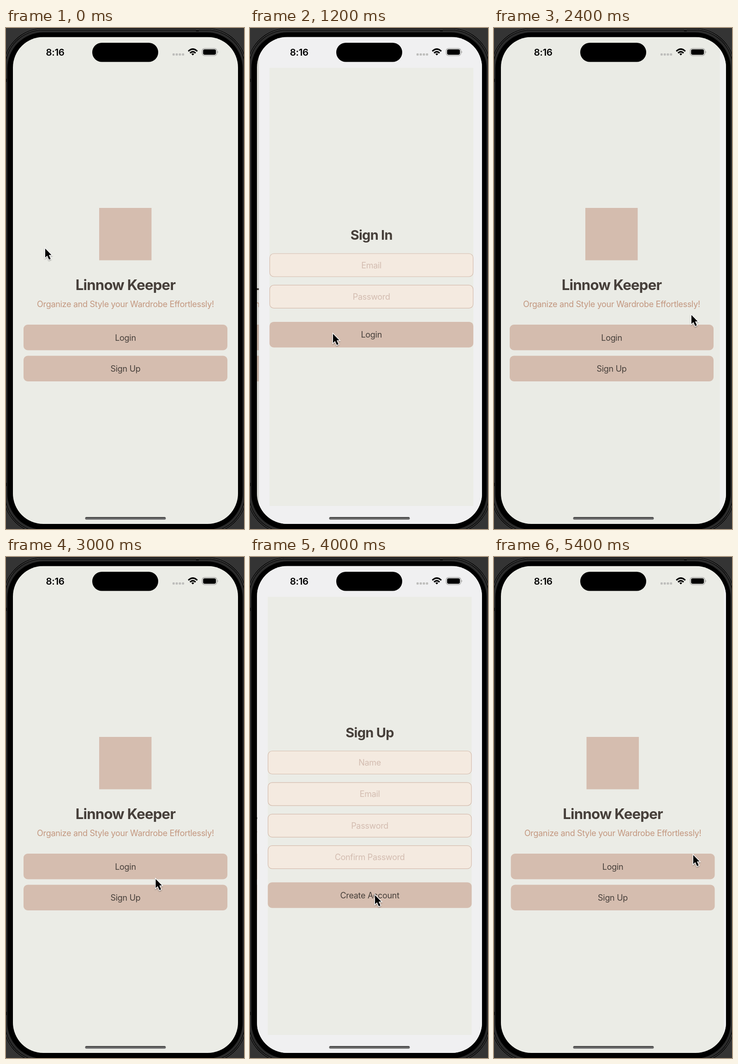
Recreate the animation shown at these times as an HTML page. Size 516x1086 px, loop 5500 ms.

```html
<!DOCTYPE html>
<html lang="en">
<head>
<meta charset="utf-8">
<title>Wardrobe app</title>
<style>
html, body { margin: 0; width: 100%; height: 100%; overflow: hidden; background: #000; }
svg { display: block; width: 516px; height: 1086px; }
text { font-family: Inter, "Noto Sans", sans-serif; text-anchor: middle; letter-spacing: -.017em; }
</style>
</head>
<body>
<svg id="stage" viewBox="0 0 516 1086"></svg>
<script>
const INK = '#463f3a', CLAY = '#d5bdaf', PAPER = '#ebece6';
const WIDTH = 488;           // width of the phone screen
const LOOP = 5500;
const stage = document.getElementById('stage');

const box = (x, y, w, h, r, fill, extra = '') =>
  `<rect x="${x}" y="${y}" width="${w}" height="${h}" rx="${r}" fill="${fill}" ${extra}/>`;
const screen = (fill, extra, r = 0) => box(15, 19.5, WIDTH, 1055.5, r, fill, extra);
const body = (inset, r, fill, extra) =>
  box(inset - 4, inset + 2.5, 524 - 2 * inset, 1092 - 2 * inset, r, fill, extra);

// y is the middle of the capitals
const label = (text, y, fill = INK, size = 18, extra = '', x = 259) =>
  `<text x="${x}" y="${y + size * .364}" font-size="${size}" fill="${fill}" ${extra}>${text}</text>`;
const heading = (text, y, size) =>
  label(text, y, INK, size, 'font-weight="700" style="letter-spacing:-.025em"');
const button = (text, y, id = '') =>
  `<g id="${id}">${box(38, y, 442, 55.5, 9, CLAY)}${label(text, y + 28)}</g>`;
const field = (text, y) =>
  box(38.5, y + .5, 441, 50, 9, '#f4eae0', `stroke="${CLAY}" stroke-width="1.2"`) +
  label(text, y + 25.5, '#d3bcb0');

// A title, a column of fields and a button below them
const form = (id, title, top, fields, action) => `<g id="${id}">
  ${heading(title, top - 40, 29)}
  ${fields.map((name, i) => field(name, top + i * 68.4)).join('')}
  ${button(action, top + fields.length * 68.4 + 11.6)}
</g>`;

stage.innerHTML = `
<defs>
  <clipPath id="glass">${screen('#fff', '', 66)}</clipPath>
  <linearGradient id="bar" x2="0" y2="1"><stop stop-color="#3c3c3c"/><stop offset="1" stop-color="#8a8a8a"/></linearGradient>
  <filter id="soft" x="-50%" y="-50%" width="200%" height="200%">
    <feDropShadow dx="0" dy="1.5" stdDeviation="1.3" flood-opacity=".4"/>
  </filter>
</defs>
${box(0, 0, 516, 1086, 0, '#343434')}
${body(0, 85, '#2b2b2b', 'stroke="#000" stroke-width="4"')}
${body(0, 85, 'none', 'stroke="#777"')}
${body(7, 78, '#000')}
${box(412, 3, 6, 5, 0, '#151515')}
${box(0, 110, 4, 7, 0, '#151515')}
${box(0, 986, 4, 7, 0, '#151515')}
<g clip-path="url(#glass)">
  ${screen(PAPER)}
  <g id="home">
    ${box(202, 390, 113.5, 113.5, 0, CLAY)}
    ${heading('Linnow Keeper', 557, 31.2)}
    ${label('Organize and Style your Wardrobe Effortlessly!', 598, '#c3977f')}
    ${button('Login', 643, 'login')}
    ${button('Sign Up', 710.5, 'join')}
  </g>
  ${screen('#000', 'id="dim"')}
  <g id="page">
    ${screen('#f0f0f1')}
    ${box(38, 86.5, 442, 949.5, 0, PAPER)}
    ${form('signIn', 'Sign In', 488.5, ['Email', 'Password'], 'Login')}
    ${form('signUp', 'Sign Up', 420, ['Name', 'Email', 'Password', 'Confirm Password'], 'Create Account')}
  </g>
</g>
${label('8:16', 52.5, '#000', 20.5, 'font-weight="600"', 106.5)}
${box(187, 32, 143, 41.5, 20.75, '#000')}
${[0, 1, 2, 3].map(i => box(361 + i * 6.8, 55, 4.8, 4.8, 1.4, '#bdbdbb')).join('')}
<g fill="none" stroke="#000" stroke-width="3.2">
  <path d="M395.3 50.4Q405 41 414.7 50.4M399 54.4Q405 48.6 411 54.4"/>
  <path d="M402 56.3Q405 53.8 408 56.3L405 59.6Z" fill="#000" stroke="none"/>
</g>
${box(425.3, 44.3, 31.8, 15.6, 5, 'none', 'stroke="#9c9c9a" stroke-width="1.2"')}
${box(427.3, 46.3, 27.8, 11.6, 3.4, '#000')}
<path d="M458.5 49.5q3 2.6 0 5.2z" fill="#9c9c9a"/>
${box(171.5, 1060, 175, 6, 3, 'url(#bar)')}
<g id="cursor">
  <g id="ring" fill="none">
    <circle cy="1" r="32.3" stroke="#fff" stroke-width="4"/>
    <circle cy="1" r="32.3" stroke="#000" stroke-width="2"/>
  </g>
  <path d="M0 0V19.5L4.4 15.4L8.2 24L11.8 22.4L8 14H13.6Z" stroke="#fff" stroke-width="2.6" paint-order="stroke" filter="url(#soft)"/>
</g>`;

// Each page is pushed by a tap and swiped away again
const VISITS = [
  { form: 'signIn', button: 'login', push: 801, pop: 2108 },
  { form: 'signUp', button: 'join', push: 3472, pop: 5095 }
];
const SWIPE = 325;

// The pointer rests between moves; bow bends the way sideways or up
const MOVES = [
  { at: 100, last: 400, x: 180, y: 663, bowX: -70 },
  { at: 1250, last: 600, x: 31, y: 614 },
  { at: VISITS[0].pop, last: 240, x: 428, y: 622 },
  { at: 2500, last: 800, x: 277, y: 733 },
  { at: 3600, last: 300, x: 271, y: 733 },
  { at: 4250, last: 650, x: 2, y: 685, bowY: -330 },
  { at: VISITS[1].pop, last: 240, x: 432, y: 646 }
];

const ease = v => {
  const k = Math.min(1, Math.max(0, v));
  return k * k * (3 - 2 * k);
};

function pointer(t) {
  let x = 85, y = 478;
  for (const m of MOVES) {
    const k = ease((t - m.at) / m.last), bow = 4 * k * (1 - k);
    x += (m.x - x) * k + (m.bowX || 0) * bow;
    y += (m.y - y) * k + (m.bowY || 0) * bow;
  }
  return [x, y];
}

// Share of the page in view: a critically damped spring in, a swipe out
function shownPart(visit, t) {
  const s = Math.max(0, t - visit.push) * .017;
  return (1 - (1 + s) * Math.exp(-s)) * (1 - ease((t - visit.pop) / SWIPE));
}

const el = id => document.getElementById(id);
const move = (id, x, y = 0) => el(id).setAttribute('transform', `translate(${x} ${y})`);
const show = (id, on) => { el(id).style.display = on ? '' : 'none'; };

function draw(t) {
  const visit = VISITS[t < 3000 ? 0 : 1];
  const { push, pop } = visit;
  const shown = shownPart(visit, t);
  move('page', WIDTH * (1 - shown));
  move('home', -.3 * WIDTH * shown);
  show('page', shown > 0);
  el('dim').setAttribute('opacity', .1 * shown);
  for (const v of VISITS) {
    show(v.form, v === visit);
    const faded = ease((t - v.push + 110) / 60) - ease((t - v.push - 5) / 250);
    el(v.button).setAttribute('opacity', 1 - .8 * faded);
  }
  move('cursor', ...pointer(t));
  show('ring', (t > push - 110 && t < push) || (t > pop - 55 && t < pop + 205));
}

const start = performance.now();
function tick() {
  draw((performance.now() - start) % LOOP);
  requestAnimationFrame(tick);
}
tick();
</script>
</body>
</html>
```
